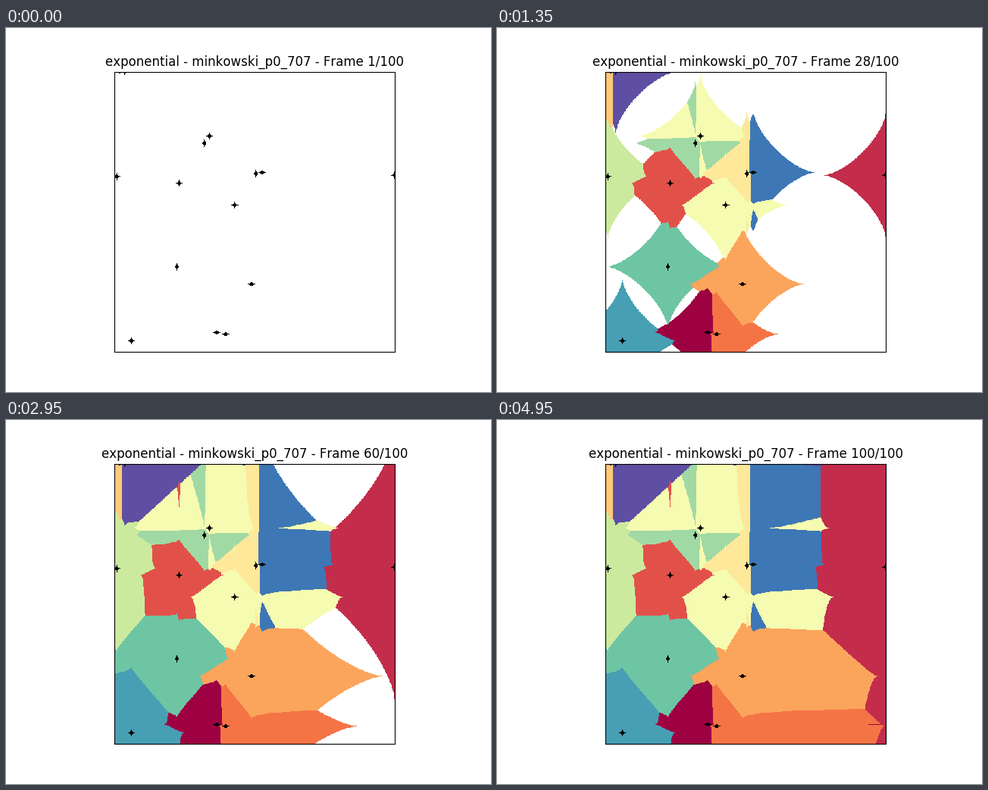
Write a matplotlib script that moves like this. It is 640x480 px and loops after 5 s.

```python
import numpy as np
import matplotlib.pyplot as plt
from matplotlib.animation import FuncAnimation

SIZE = 500       # cells per side
FRAMES = 100
P = 0.707        # Minkowski exponent
DOT = 6          # radius of the black seed marks

# Key points: seed cells (column, row) in colour map order
SEEDS = [
    (182, 465), (499, 185), (115, 199), (198, 468), (244, 379),
    (9, 0), (252, 182), (169, 115), (214, 238), (4, 187),
    (160, 128), (111, 348), (30, 480), (263, 180), (18, 0),
]

plt.rcParams["font.family"] = "DejaVu Sans"
plt.rcParams["text.kerning_factor"] = 6   # kerning in whole pixels only

colors = plt.get_cmap("Spectral")(np.linspace(0, 1, len(SEEDS)))[:, :3]
colors[7:9] = colors[7:9].mean(axis=0)   # both pale yellows share one tone


def distances(col, row):
    """Minkowski distance of every cell to one seed."""
    axis = np.arange(SIZE)
    dx = np.abs(axis - col) ** P
    dy = np.abs(axis - row) ** P
    return (dx[None, :] + dy[:, None]) ** (1 / P)


dist = np.array([distances(*seed) for seed in SEEDS])
nearest = dist.min(axis=0)
cells = colors[dist.argmin(axis=0)]
dots = nearest <= DOT + 1e-6
reach = nearest.max()


def picture(n):
    """Cells within the radius of step n, white elsewhere."""
    grown = nearest <= reach * n / FRAMES + 1e-6
    img = np.where(grown[..., None], cells, 1.0)
    img[dots] = 0
    return img


fig, ax = plt.subplots(figsize=(6.4, 4.8), dpi=100)
ax.set_xticks([])
ax.set_yticks([])
image = ax.imshow(picture(1), interpolation="nearest")
title = ax.set_title("")


def update(i):
    n = i + 1
    image.set_data(picture(n))
    title.set_text(f"exponential - minkowski_p0_707 - Frame {n}/{FRAMES}")
    return image, title


anim = FuncAnimation(fig, update, frames=FRAMES, interval=50,
                     repeat=True, repeat_delay=0, blit=False)
plt.show()
```
